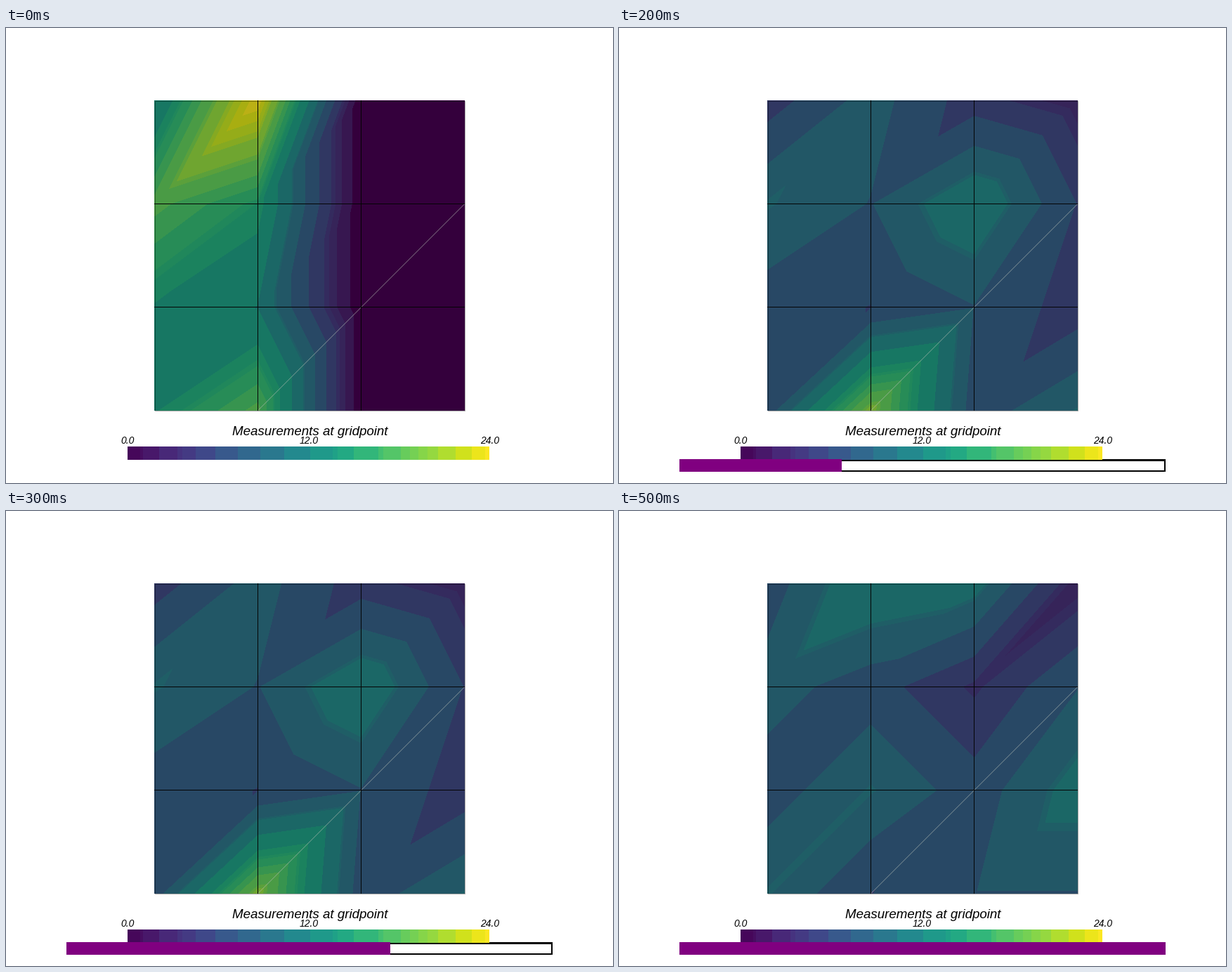
A matplotlib script for the animation above (0.6 s loop, 864 px wide and 648 px high).

```python
import matplotlib.pyplot as plt
import numpy as np
from matplotlib.animation import FuncAnimation
from matplotlib.patches import Rectangle

W, H, DPI = 864, 648, 100
PT = 72 / DPI
LEFT, TOP, SIDE = 211, 103, 442
RIGHT, BOTTOM = LEFT + SIDE, TOP + SIDE
BAR_X, BAR_W, VMAX = 173, 515, 24
PROG = (86, 614, 692, 18)

# Measurements on the 4 x 4 grid, rows from top to bottom
STATES = np.array([
    [[12, 24, 0, 0], [18, 15, 0, 0], [14, 12, 0, 0], [14, 18, 0, 0]],
    [[5, 9, 5, 3], [10, 8, 12, 6], [7, 6, 8, 5], [7, 20, 7, 10]],
    [[7, 12, 11, 3], [9, 7, 4, 8], [7, 10, 7, 11], [10, 6, 8, 8]],
], float)
LEVELS = [1.3, 2.8, 3.7, 4.33, 6.05, 8.08, 9.82, 10.05, 12.05, 14.15, 15.05,
          15.4, 16.45, 17.5, 18.86, 19.3, 20.75, 21.3, 22.2, 23.1]
BAR_STOPS = [173, 191, 195, 218, 244, 251, 270, 298, 330, 362, 396, 433, 465,
             472, 495, 530, 537, 562, 575, 587, 600, 615, 640, 663, 682, 688]
LIGHT = np.array([0.77, 0.77, 0.72])


def viridis(value):
    return np.array(plt.cm.viridis(value / VMAX))[..., :3]


def band_colors():
    stops = np.array([0, *LEVELS, VMAX])
    mids = (stops[:-1] + stops[1:]) / 2
    mids[0] = 0
    return viridis(mids) * LIGHT


def surface(values):
    """Linear interpolation on cells split from bottom left to top right."""
    t = (np.arange(SIDE) + 0.5) / SIDE * 3
    cell, frac = t.astype(int), t % 1
    col, row = np.meshgrid(cell, cell)
    fx, fy = np.meshgrid(frac, frac)
    tl, tr = values[row, col], values[row, col + 1]
    bl, br = values[row + 1, col], values[row + 1, col + 1]
    upper = tl + fx * (tr - tl) + fy * (bl - tl)
    lower = br + (1 - fx) * (bl - br) + (1 - fy) * (tr - br)
    field = np.where(fx + fy < 1, upper, lower)
    return band_colors()[np.digitize(field, LEVELS)]


def box(x, y, w, h, color, z=2):
    patch = Rectangle((x, y), w, h, fc=color, ec="none", lw=0, zorder=z)
    return ax.add_patch(patch)


def label(x, baseline, text, size):
    ax.text(x, baseline, text, fontsize=size * PT, ha="center", va="baseline",
            family="Liberation Sans", style="italic", color="black", zorder=8)


fig = plt.figure(figsize=(W / DPI, H / DPI), dpi=DPI, facecolor="white")
ax = fig.add_axes([0, 0, 1, 1])
ax.axis("off")

images = [surface(values) for values in STATES]
mesh = ax.imshow(images[0], extent=(LEFT, RIGHT, BOTTOM, TOP),
                 interpolation="nearest", aspect="auto", zorder=1)
ax.set(xlim=(0, W), ylim=(H, 0))

# Cell edges, outer rim and the bright seam
ax.plot([LEFT + SIDE / 3, RIGHT], [BOTTOM, TOP + SIDE / 3], color="#b4beb4",
        alpha=0.6, lw=0.8 * PT, zorder=3)
for k in (1, 2):
    offset = int(k * SIDE / 3)
    box(LEFT + offset, TOP, 1.2, SIDE, "#040404", 4)
    box(LEFT, TOP + offset, SIDE, 1.2, "#040404", 4)
ax.add_patch(Rectangle((LEFT + 0.5, TOP + 0.5), SIDE - 1, SIDE - 1, fill=False,
                       ec="black", lw=PT, alpha=0.35, zorder=4))

# Colour bar
for a, b in zip(BAR_STOPS, BAR_STOPS[1:]):
    box(a, 596, b - a, 19, viridis(((a + b) / 2 - BAR_X) / BAR_W * VMAX), 6)
label(432.5, 580, "Measurements at gridpoint", 18.8)
for value in (0, 12, 24):
    label(BAR_X + 0.5 + BAR_W * value / VMAX, 592, f"{value:.1f}", 13.9)

# Progress bar
px, py, pw, ph = PROG
frame_parts = [box(px, py, pw, ph, "black", 5),
               box(px + 2.5, py + 2.5, pw - 5, ph - 5, "white", 5.5)]
fill = box(px, py, 0, ph, "#800080", 7)


def update(i):
    done = (i + 1) // 2 / 3
    mesh.set_data(images[i // 2])
    fill.set_width(pw * done)
    for part in (*frame_parts, fill):
        part.set_visible(done > 0)
    return mesh, fill, *frame_parts


anim = FuncAnimation(fig, update, frames=6, interval=100, repeat=True,
                     repeat_delay=0, blit=False)
plt.show()
```
